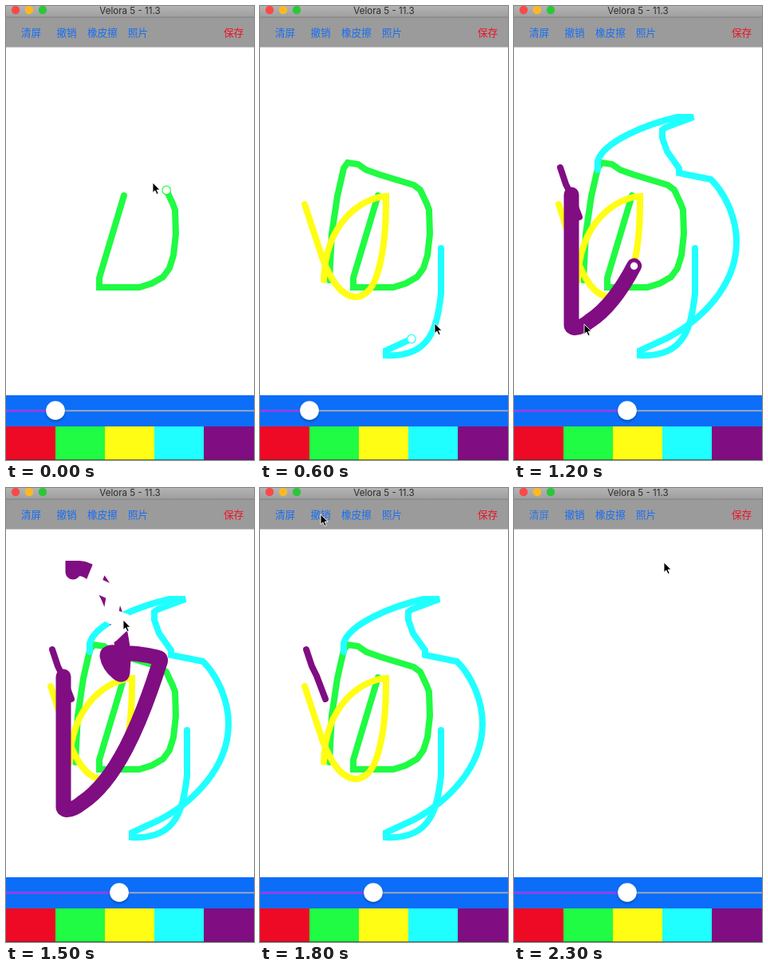
These frames come from a looping animation (311 by 568 pixels, 2.4 s). An HTML page:

```html
<!DOCTYPE html>
<html lang="zh">
<head>
<meta charset="utf-8">
<style>
  html, body { margin: 0; width: 100%; height: 100%; overflow: hidden; background: #fff; }
  svg { display: block; width: 311px; height: 568px; }
  .tools { font: 12.6px "Noto Sans CJK SC", "Noto Sans CJK", sans-serif; fill: #176df3; }
  .title { font: 11.6px Inter, "Liberation Sans", sans-serif; fill: #2c2c2c; text-anchor: middle; }
</style>
</head>
<body>
<svg viewBox="0 0 311 568">
  <defs>
    <linearGradient id="bar" x2="0" y2="1">
      <stop stop-color="#b3b3b3"/><stop offset="1" stop-color="#9f9f9f"/>
    </linearGradient>
    <filter id="shadow" x="-50%" y="-50%" width="200%" height="200%">
      <feDropShadow dx="0" dy="2" stdDeviation="1.6" flood-opacity=".3"/>
    </filter>
  </defs>
  <rect width="311" height="568" fill="#fff"/>
  <g id="drawing" fill="none" stroke-linecap="round"></g>
  <circle id="touch" r="5.3" fill="#fff" stroke-width="1.2"/>

  <rect y="14" width="311" height="37.6" fill="#9b9b9b"/>
  <rect width="311" height="14" fill="url(#bar)"/>
  <rect y="13.5" width="311" height="1" fill="#808080"/>
  <circle cx="12" cy="5" r="5.2" fill="#fb4948"/>
  <circle cx="29" cy="5" r="5.2" fill="#fdb924"/>
  <circle cx="46" cy="5" r="5.2" fill="#2bc739"/>
  <text class="title" x="155.5" y="9.5">Velora 5 - 11.3</text>
  <g class="tools">
    <text id="clear" x="19" y="38">清屏</text>
    <text id="undo" x="63.5" y="38">撤销</text>
    <text x="102" y="38">橡皮擦</text>
    <text x="153" y="38">照片</text>
    <text x="273" y="38" fill="#f01226">保存</text>
  </g>

  <rect y="487" width="311" height="39" fill="#0c6df8"/>
  <rect y="505.5" width="311" height="1.8" fill="#a9adb5"/>
  <rect id="track" y="505.5" height="1.8" fill="#b51cea"/>
  <circle id="thumb" cy="506" r="11.8" fill="#fff" filter="url(#shadow)"/>
  <g id="palette"></g>
  <rect y="567.4" width="311" height="1" fill="#333"/>
  <path id="cursor" d="M0 0V12.5L2.9 9.9L5 14.6L7.2 13.6L5.1 9.1H9Z" fill="#000" stroke="#fff" stroke-width=".9"/>
</svg>
<script>
const NS = 'http://www.w3.org/2000/svg';
const $ = id => document.getElementById(id);
const add = (parent, tag, attrs) => {
  const el = document.createElementNS(NS, tag);
  set(el, attrs);
  return parent.appendChild(el);
};
function set(el, attrs) {
  for (const key in attrs) el.setAttribute(key, attrs[key]);
}

const STEP = 100, STEPS = 24;
const RED = '#ee0a25', GREEN = '#20fb43', YELLOW = '#fffd14', CYAN = '#20ffff', PURPLE = '#800d82';

[RED, GREEN, YELLOW, CYAN, PURPLE].forEach((fill, i) =>
  add($('palette'), 'rect', { x: i * 62, y: 526, width: 63, height: 42, fill }));

// Each stroke grows through its amounts from step `from`, and is removed at step `until`.
const strokes = [
  { color: GREEN, width: 8, from: 0, until: 22, amounts: [.56, .86, 1],
    d: 'M148 237L117 340V352H167L183 347 197 339 205 328 210 312 213 285 212 255 209 247 201 230 193 224 150 211 133 205 123 198 110 196 105 203 97 238 90 285 87 343' },
  { color: YELLOW, width: 8, from: 3, until: 22, amounts: [.5, 1],
    d: 'M56 248L78 315C88 340 100 363 120 364C140 363 148 340 154 305C158 280 158 260 158 238C128 240 82 270 80 343' },
  { color: CYAN, width: 8, from: 6, until: 22, amounts: [.288, .66, .96, 1],
    d: 'M227 303V360C222 402 214 440 158 437V431L191 416C235 393 279 350 279 295C279 265 265 235 247 217L207 209V203L192 182 186 165V155L190 152 225 139H205C165 148 112 170 105 194V205' },
  { color: PURPLE, width: 8, from: 10, until: 22, amounts: [1],
    d: 'M58 202L65 223 71 235 82 264' },
  { color: PURPLE, width: 19, from: 12, until: 18, amounts: [.42, 1],
    d: 'M72 236V399Q72 402 76 402.5Q84 403 95 394C138 366 168 296 192 221Q196 213 190 212Q165 206 137 206Q127 205 127 210Q129 222 140 231Q146 236 146 230L147 215C147 180 126 102 92 100.5H84V105' },
  { color: '#fff', width: 19, from: 15, until: 16, amounts: [1], join: 'round',
    d: 'M118 98L109 120 136 132 131 160 150 167 132 184' }
];
for (const s of strokes) {
  s.el = add($('drawing'), 'path', {
    d: s.d, stroke: s.color, 'stroke-width': s.width, 'stroke-linejoin': s.join || 'miter'
  });
  s.length = s.el.getTotalLength();
}

const cursorPath = [
  [184, 221], [117, 196], [154, 545], [137, 352], [81, 340], [216, 545],
  [219, 397], [267, 240], [105, 190], [290, 548], [87, 444], [142, 505],
  [88, 398], [84, 104], [120, 36], [147, 165], [77, 35], [76, 33],
  [76, 33], [71, 34], [50, 36], [36, 37], [36, 37], [188, 93]
];

function draw(step) {
  let active = null;
  for (const s of strokes) {
    const shown = step >= s.from && step < s.until;
    s.el.style.display = shown ? '' : 'none';
    if (!shown) continue;
    const amount = s.amounts[Math.min(step - s.from, s.amounts.length - 1)];
    set(s.el, { 'stroke-dasharray': amount < 1 ? `${amount * s.length} 9999` : 'none' });
    if (amount < 1) active = { color: s.color, point: s.el.getPointAtLength(amount * s.length) };
  }
  $('touch').style.display = active ? '' : 'none';
  if (active) set($('touch'), { cx: active.point.x, cy: active.point.y, stroke: active.color });

  const level = step < 11 ? 62 : 142;
  set($('track'), { width: level });
  set($('thumb'), { cx: level });
  set($('undo'), { opacity: step === 17 ? .3 : 1 });
  set($('clear'), { opacity: step === 22 ? .35 : step === 23 ? .8 : 1 });
  set($('cursor'), { transform: `translate(${cursorPath[step]})` });
}

const start = performance.now();
function tick() {
  draw(Math.floor((performance.now() - start) / STEP) % STEPS);
  requestAnimationFrame(tick);
}
draw(0);
requestAnimationFrame(tick);
</script>
</body>
</html>
```
